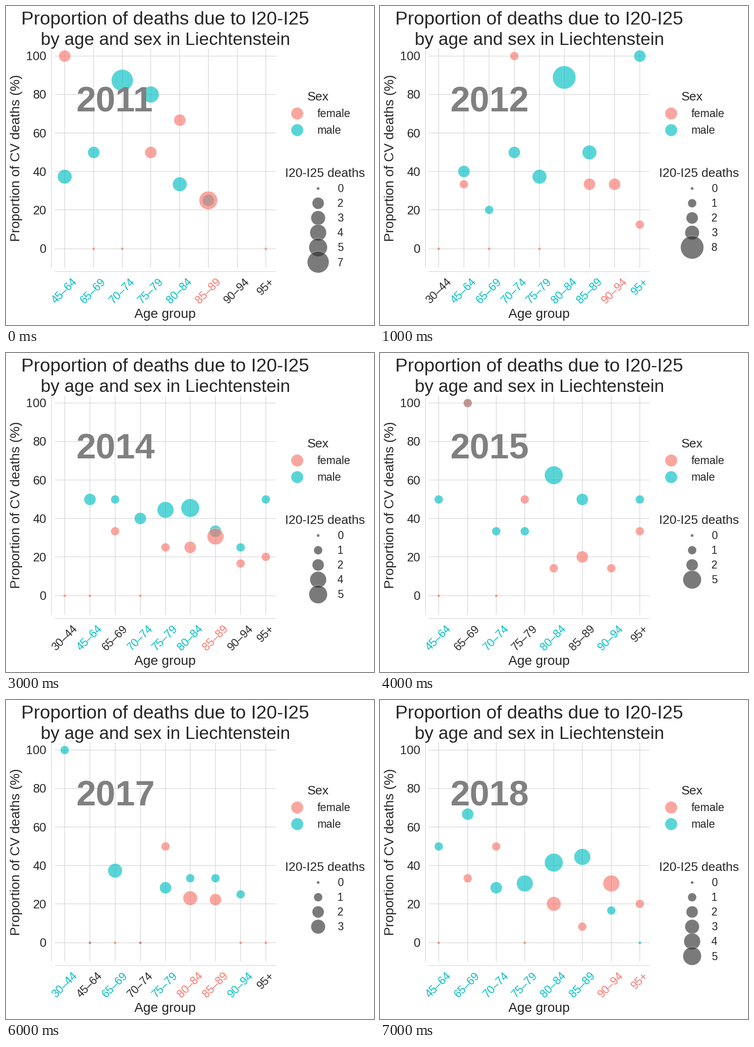
Write a matplotlib script that moves like this. It is 774 by 672 pixels and loops after 8000 ms.

```python
import matplotlib.pyplot as plt
from matplotlib.animation import FuncAnimation

W, H, DPI = 774, 672, 96
PT = 72 / DPI  # points per pixel
INK, GRID = "#262626", "#cccccc"
MALE, FEMALE = "#00BFC4", "#F8766D"
LEFT, RIGHT, TOP, BOTTOM = 102, 567, 89, 551
AGES = ["30–44", "45–64", "65–69", "70–74", "75–79",
        "80–84", "85–89", "90–94", "95+"]

# Per year: I20-I25 deaths / all CV deaths, male then female, for the last
# age groups; "-" is no data, a lone number has no rate to plot.
DATA = {
    2011: ("3/8 2/4 7/8 4/5 3/9 2/8 - -",
           "2/2 0/1 0/1 2/4 2/3 5/20 - 0/1"),
    2012: ("- 2/5 1/5 2/4 3/8 8/9 3/6 - 2/2",
           "0/1 1/3 0/1 1/1 0/1 - 2/6 2/6 1/8"),
    2013: ("1/6 1/1 2/5 2/5 3/9 2/3 3/5 1/1",
           "1/1 0/1 0/1 2/2 - 4/7 - 0/1"),
    2014: ("- 2/4 1/2 2/5 4/9 5/11 2/6 1/4 1/2",
           "0/1 0/1 1/3 0/1 1/4 2/8 4/13 1/6 1/5"),
    2015: ("1/2 1/1 1/3 1/3 5/8 2/4 2 1/2",
           "0/1 1/1 0/1 1/2 1/7 2/10 1/7 1/3"),
    2016: ("2/5 1/3 1/4 2/6 3/8 2/5 1/4 -",
           "0/1 0/1 - 1/3 2/9 3/11 1/5 -"),
    2017: ("1/1 0/1 3/8 0/1 2/7 1/3 1/3 1/4 -",
           "- 0/1 0/1 0/1 1/2 3/13 2/9 0/1 0/1"),
    2018: ("1/2 2/3 2/7 4/13 5/12 4/9 1/6 0/1",
           "0/1 1/3 1/2 0/1 3/15 1/12 4/13 1/5"),
}

plt.rcParams["font.family"] = "Liberation Sans"
fig = plt.figure(figsize=(W / DPI, H / DPI), dpi=DPI, facecolor="white")
ax = fig.add_axes([0, 0, 1, 1])


def parse(row):
    """Turn a row into (deaths, percentage) pairs."""
    pairs = []
    for item in row.split():
        n, _, total = item.partition("/")
        deaths = 0 if n == "-" else int(n)
        pairs.append((deaths, 100 * deaths / int(total) if total else None))
    return pairs


def y_at(percent):
    return 510.55 - 4.054 * percent


def line(x0, y0, x1, y1):
    ax.plot([x0, x1], [y0, y1], color=GRID, lw=PT, zorder=1,
            solid_capstyle="butt")


def text(x, y, s, px, ha="left", va="baseline", color=INK, **kw):
    ax.text(x, y, s, fontsize=px * PT, ha=ha, va=va, color=color, **kw)


def bubble(x, y, r, color):
    ax.scatter([x], [y], s=(2 * r * PT) ** 2, c=color, alpha=0.65,
               edgecolors="white", linewidths=0.6, zorder=2)


def radius(deaths):
    return (10 + 72.5 * deaths) ** 0.5


def draw_frame():
    text(334.5, 39, "Proportion of deaths due to I20-I25", 39.2, "center")
    text(335, 82, "by age and sex in Liechtenstein", 37.4, "center")
    text(335, 657, "Age group", 28, "center")
    text(22, 320.5, "Proportion of CV deaths (%)", 28.1, "center", "center",
         rotation=90)
    line(95, TOP, 95, BOTTOM)
    line(LEFT, 559, RIGHT, 559)
    for p in range(0, 101, 20):
        line(LEFT, y_at(p), RIGHT, y_at(p))
        text(85, y_at(p) + 9.2, str(p), 25.6, "right")


def draw_legend(sizes):
    text(656, 199, "Sex", 26.2, "center")
    for y, name, color in ((225.7, "female", FEMALE), (260.5, "male", MALE)):
        bubble(612.4, y, 12.9, color)
        text(654.7, y + 8.2, name, 23.3)
    text(671.2, 360, "I20-I25 deaths", 26.2, "center")
    for i, n in enumerate(sizes):
        y = 383.5 + 31.15 * i
        bubble(656.2, y, radius(n), "#333333")
        text(696.7, y + 8.3, str(n), 22.8)


def draw(i):
    ax.cla()
    ax.axis("off")
    draw_frame()
    year = 2011 + i
    male, female = map(parse, DATA[year])
    ages = AGES[-len(male):]
    step = 422.7 / (len(ages) - 1)
    xs = [123.2 + step * k for k in range(len(ages))]

    for x, age, (m, _), (f, _) in zip(xs, ages, male, female):
        line(x, TOP, x, BOTTOM)
        color = MALE if m > f else FEMALE if f > m else INK
        text(x, 569, age, 23.4, "center", "top", color, rotation=45)

    sizes = set()
    for points, color in ((male, MALE), (female, FEMALE)):
        for x, (n, percent) in zip(xs, points):
            if percent is not None:
                bubble(x, y_at(percent), radius(n), color)
                sizes.add(n)

    text(147, 222, str(year), 74.5, color="#808080", weight="bold", zorder=4)
    draw_legend(sorted(sizes))
    ax.set_xlim(0, W)
    ax.set_ylim(H, 0)
    return []


anim = FuncAnimation(fig, draw, frames=len(DATA), init_func=lambda: [],
                     interval=1000, repeat=True, repeat_delay=0, blit=False)
plt.show()
```
